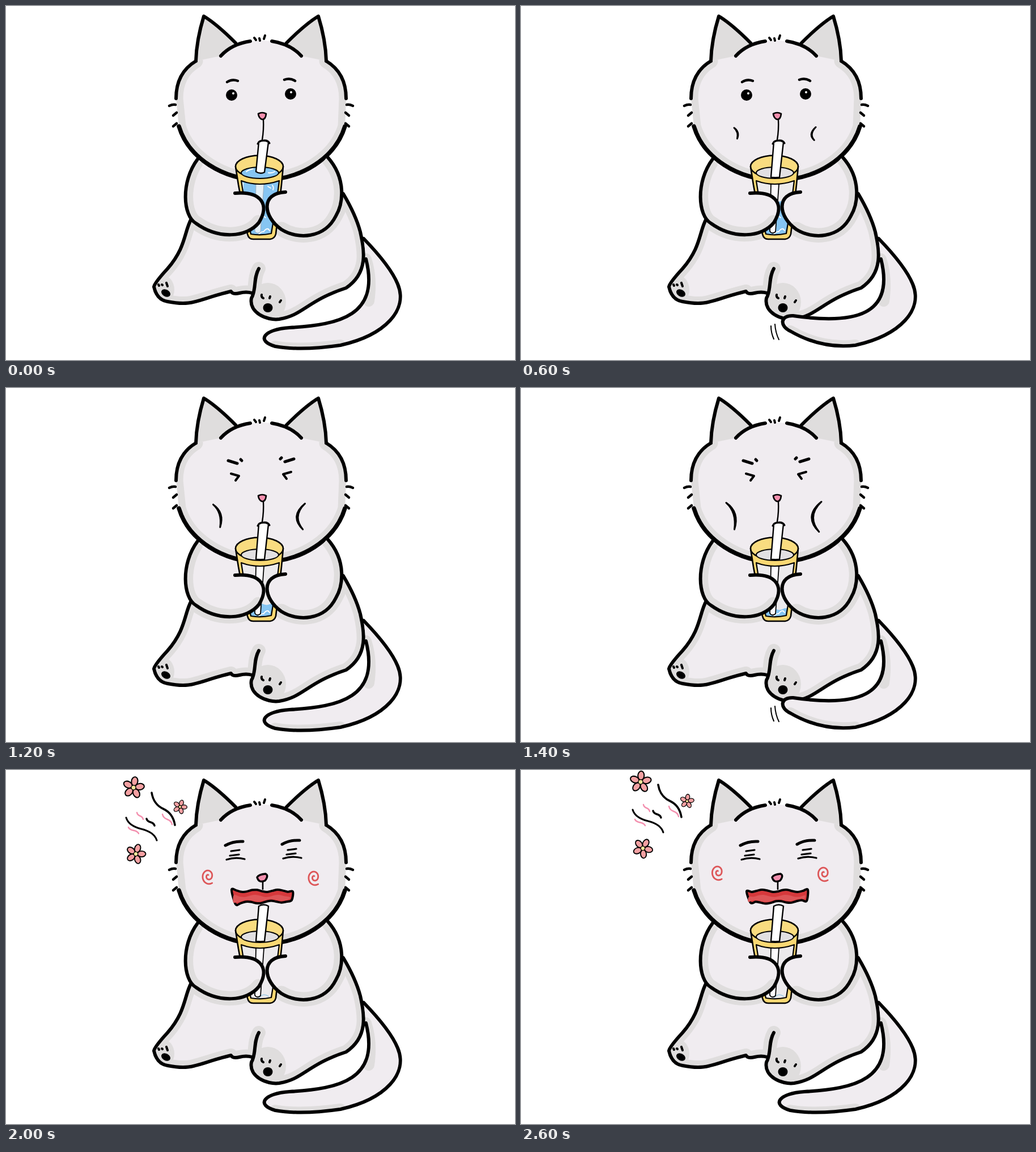
Recreate the animation shown at these times as an HTML page. Size 898x624 px, loop 2800 ms.

```html
<!DOCTYPE html>
<html lang="en">
<head>
<meta charset="utf-8">
<title>Thirsty cat</title>
<style>
html, body { margin: 0; width: 100%; height: 100%; overflow: hidden; background: #fff; }
svg { display: block; width: 898px; height: 624px; }
</style>
</head>
<body>
<svg id="stage" viewBox="0 0 898 624" stroke-linecap="round" stroke-linejoin="round" fill="none"></svg>
<script>
const STEP = 200, COUNT = 14, SIPS = 10;
const LIGHT = '#f0ecf0', SHADE = '#dfdddd', INK = '#000';
const YELLOW = '#f9d873', BLUE = '#86c5f2', PINK = '#f38fae', RED = '#dd5658';

const path = (d, w, stroke = INK, fill = 'none') =>
  `<path d="${d}" stroke="${w ? stroke : 'none'}" stroke-width="${w}" fill="${fill}"/>`;
const oval = (x, y, rx, ry, fill, w = 0) =>
  `<ellipse cx="${x}" cy="${y}" rx="${rx}" ry="${ry}" fill="${fill}" stroke="${INK}" stroke-width="${w}"/>`;
const move = (x, y, s) => `<g transform="translate(${x} ${y})">${s}</g>`;
const clip = (id, d, s) => `<clipPath id="${id}"><path d="${d}"/></clipPath><g clip-path="url(#${id})">${s}</g>`;

// Draws a part and its copy mirrored about the middle of the face
const pair = (s, dy = 0) => s + `<g transform="translate(900 ${dy}) scale(-1 1)">${s}</g>`;

// Light shape with a soft grey rim along the given edge
const shaded = (id, d, edge, w, extra = '') =>
  path(d, 0, INK, LIGHT) + clip(id, d, path(edge, w, SHADE) + extra);

// Smooth closed curve through points
function loop(p) {
  const at = i => p[(i + p.length) % p.length];
  const lean = (i, s) => [0, 1].map(j => (at(i)[j] + s * (at(i + 1)[j] - at(i - 1)[j]) / 6).toFixed(1));
  return 'M' + p[0] + p.map((_, i) => `C${lean(i, 1)} ${lean(i + 1, -1)} ${at(i + 1)}`).join('') + 'Z';
}

const ARM_L = 'M338,270C308,310 312,370 335,383C375,412 425,408 446,382';
const HAND_L = 'C466,350 450,326 404,330';
const ARM_R = 'M567,266C602,305 594,350 582,370C562,410 515,412 486,394';
const HAND_R = 'C454,372 448,330 493,328';

function body() {
  const left = 'M327,375C314,398 318,425 285,463Q262,488 261,495Q266,518 285,521C330,530 335,518 397,503';
  const belly = 'Q400,509 412,506T434,506';
  const right = '446,463C436,480 442,500 433,515C428,540 460,555 482,552C525,545 530,520 600,497C640,470 632,430 625,398Q617,368 595,331';
  const feet = oval(275, 500, 22, 26, SHADE) + oval(462, 522, 32, 34, SHADE);
  const toes = 'M269,491l1,2M275,491l1,1M283,488l2,6M451,509q-1,4 3,6M466,512l-1,3M485,519l-2,3';
  return shaded('body', `${left}${belly}L${right}L566,270L340,275Z`, left + belly + 'M' + right + ARM_L + ARM_R, 24, feet) +
    path(left + belly, 6) + path('M' + right, 6) + path(toes, 4) +
    `<g transform="rotate(30 282 506)">${oval(282, 506, 8.5, 6, INK)}</g>` + oval(462, 532, 8.5, 8, INK);
}

function head() {
  const side = 'M335,97Q300,118 300,163', chin = 'M305,212A151,125 0 0 0 598,212';
  const skull = side + 'L305,212A151,125 0 0 0 598,212L600,163Q600,118 565,97L521,88Q490,60 450,61Q410,60 379,88Z';
  const ear = 'M335,97Q336,60 349,18Q372,32 405,65';
  const whiskers = 'M288,176q6,-3 11,-2M295,193l6,-5M295,212l6,-5';
  return pair(path(ear + 'L379,92Z', 0, INK, SHADE)) +
    shaded('head', skull, side + 'L305,212A151,125 0 0 0 598,212L600,163Q600,118 565,97', 25) +
    pair(path(ear, 6) + path(side, 6) + path('M379,88Q398,67 431,62', 6) + path(whiskers, 4.5)) +
    path(chin, 7.5) + path('M438,56l3,4M447,57l1,4M457,52l-2,6', 4);
}

const arms = () =>
  shaded('armL', ARM_L + HAND_L + 'L360,296Z', ARM_L, 27) + path(ARM_L + HAND_L, 6) +
  shaded('armR', ARM_R + HAND_R + 'L545,292Z', ARM_R, 27) + path(ARM_R + HAND_R, 6);

function tail(up) {
  const base = 'M631,410C660,440 682,468 691,490C710,535 670,580 590,598';
  const tip = up ? 'Q530,605 475,573C455,563 458,545 480,546' : 'Q520,608 475,600C440,590 455,570 500,567';
  const d = base + tip + 'C590,562 660,545 635,446';
  return shaded('tail', d, 'M640,520Q646,480 635,446M590,598' + tip.split('C')[0], 20) + path(d, 6) +
    (up ? path('M441,564q0,12 5,23M448,561q1,15 7,27', 2) : '');
}

function cup(k) {
  const full = k === 0, glass = 'M415,308Q447,320 482,308L478,340 468,401Q450,405 432,402L424,365Z';
  const y = 400 - 100 * Math.max(0, 1 - k / 9) ** 1.5;
  let water = `M490,420H410V${y}`;
  for (let x = 410; x <= 490; x += 5) water += `L${x},${(y + 1.8 * Math.sin(x / 4 + k)).toFixed(1)}`;
  const foam = 'M418,312v10M462,318l5,3M455,371l3,2M455,397q7,-8 10,-1M462,364l3,2M470,316q3,4 1,8M446,402q5,-5 9,-4';
  const liquid = k < 9
    ? path(water + 'Z', 0, INK, BLUE) + clip('water', water + 'Z', path(foam, 1.8, '#fff'))
    : path('M446,402q8,-10 17,-3', 1.6, '#a9cfe6');
  const pipe = path('M441,314L439,397Q443,403 449,398L455,314', full ? 1 : 1.8, full ? '#9ab' : INK, full ? '#e4f0f7' : '#fdfbfd');
  return path('M405,283L410,315 426,402Q428,411 436,411L466,411Q474,410 476,402L486,315 489,283Z', 2.6, INK, YELLOW) +
    oval(447, 283, 42, 19.5, '#f9dc80', 2.6) + oval(448, 294, 33, 10, full ? BLUE : '#e2e0e2', 2) +
    (full ? path('M424,292q5,-4 12,-5M463,294q6,1 11,-2', 2, '#fff') : '') +
    path(glass, 0, INK, '#eceaec') + clip('glass', glass, liquid + pipe) + path(glass, 2.2) +
    path(`M446,240L441,${full ? 292 : 302}Q449,${full ? 297 : 303} 456,${full ? 293 : 302}L463,240Q455,235 446,240Z`, 2.4, INK, '#fff') +
    (k < SIPS ? path('M444,243Q446,237 454,237Q462,236 465,242', 3) : '');
}

// Crescents that swell as the mouth fills
function cheeks(k) {
  const g = (k - 1) / 8, w = 7 * g;
  const arc = (x1, y1, cx, cy, x2, y2, side) =>
    path(`M${x1},${y1}Q${cx},${cy} ${x2},${y2}Q${cx + side * w},${cy} ${x1},${y1}Z`, 3, INK, INK);
  return arc(383 - 28 * g, 221 - 25 * g, 386, 224 - 7 * g, 384 - 10 * g, 226 + 31 * g, -1) +
    arc(515 + 20 * g, 220 - 26 * g, 510 - 16 * g, 226, 513 + 17 * g, 228 + 34 * g, 1);
}

function eyes(k) {
  const brow = path('M390,134Q399,128 409,132', 4.5);
  const squint = path('M397,151L411,155L405,163', 4);
  if (k === 1) return pair(brow + path('M388,158Q398,161 409,157', 4), -2);
  if (k < 5) return pair(brow + oval(398, 157, 10, 10, INK), -2) + oval(401, 154, 2, 2, '#fff') + oval(503, 152, 2, 2, '#fff');
  if (k === 5) return pair(brow + squint, -3);
  const frown = 2 * Math.max(0, k - 7);
  return pair(squint + path(`M${392 + frown},${128 - frown}L408,133M414,126l2,2`, 5), -3);
}

const sipping = k => eyes(k) + (k ? cheeks(k) : '') + path('M454,200Q455,218 452,236', 2.4) +
  path('M445,190Q452,186 459,190Q458,200 452,200Q446,198 445,190Z', 2.6, INK, PINK);

function spiral(x, y) {
  let d = '';
  for (let a = 0; a <= 10; a += .25) {
    const r = 14.5 - a * 1.25;
    d += `${d ? 'L' : 'M'}${(x + r * .85 * Math.cos(a + 1)).toFixed(1)},${(y + r * Math.sin(a + 1)).toFixed(1)}`;
  }
  return path(d, 2.8, RED);
}

function flower(x, y, r, turn) {
  let s = '';
  for (let i = 0; i < 5; i++)
    s += `<g transform="rotate(${turn + i * 72})">${oval(r * .6, 0, r * .43, r * .3, '#f4a0a2', r / 9)}</g>`;
  return move(x, y, s + oval(0, 0, r * .22, r * .22, '#fae79a', 1.2));
}

const streak = (x, y, dx, dy, w, color) =>
  path(`M${x},${y}q${dx * .08},${dy * .36} ${dx / 2},${dy / 2}t${dx / 2},${dy / 2}`, w, color);

// Wobbly lips between two heights
function lips(top, low, inset, phase) {
  const p = [], wob = (x, s) => 2 * Math.sin(x / 6.5 + phase + s);
  for (let x = 398 + inset; x < 508; x += 9) p.push([x, top + wob(x, 0)]);
  for (let x = 504 - inset; x > 396; x -= 9) p.push([x, low - (x - 450) / 28 + wob(x, 2)]);
  return loop(p);
}

function tipsy(n) {
  const t = n / 3, phase = n % 2 * 2, last = n === 3;
  const lid = path('M387,133Q401,125 418,126', 5) + path('M397,143l15,-2M395,151l16,-2M389,158q16,-5 32,-1', 3.2);
  const streaks = streak(257, 40, 41, 57, 3.6) + streak(248, 86, 14, 12, 3.4) + streak(212, 84, 54, 40, 3) +
    streak(231, 75, 11, 12, 2.4, PINK) + streak(276, 78, 17, 18, 2.4, PINK) + streak(216, 101, 18, 11, 2.4, PINK);
  const flowers = flower(225, 31, 18.5, -80 - 6 * t) + flower(307, 65, 12, -70 - 12 * t) + flower(229, 148, 17, -72 + 12 * t);
  return lid + move(100, -2, lid) + path('M453,196v14', 2.6) +
    path('M443,189Q446,184 458,183Q464,186 457,195Q446,200 443,189Z', 3.4, INK, PINK) +
    path(lips(213, 233, 0, phase), 4, INK, '#d6393c') + path(lips(222, 230, 4, phase), 0, INK, RED) +
    move(last ? -9.5 : 0, last ? -7 : 0, spiral(357, 187) + spiral(544, 189)) +
    move(-15 * t, -14 * t, streaks) + move(-14 * t, -10 * t, flowers);
}

const stage = document.getElementById('stage');
stage.innerHTML = '<rect width="898" height="624" fill="#fff"/>' + body() + '<g id="swish"></g>' +
  head() + '<g id="face"></g><g id="drink"></g>' + arms();
const fill = (id, s) => { document.getElementById(id).innerHTML = s; };

let shown = -1, start = null;
function draw(ms) {
  const k = Math.floor(ms / STEP) % COUNT;
  if (k === shown) return;
  shown = k;
  fill('swish', tail(k === 3 || k === 7));
  fill('face', k < SIPS ? sipping(k) : tipsy(k - SIPS));
  fill('drink', cup(k));
}
function tick(now) {
  start ??= now;
  draw(now - start);
  requestAnimationFrame(tick);
}
draw(0);
requestAnimationFrame(tick);
</script>
</body>
</html>
```
